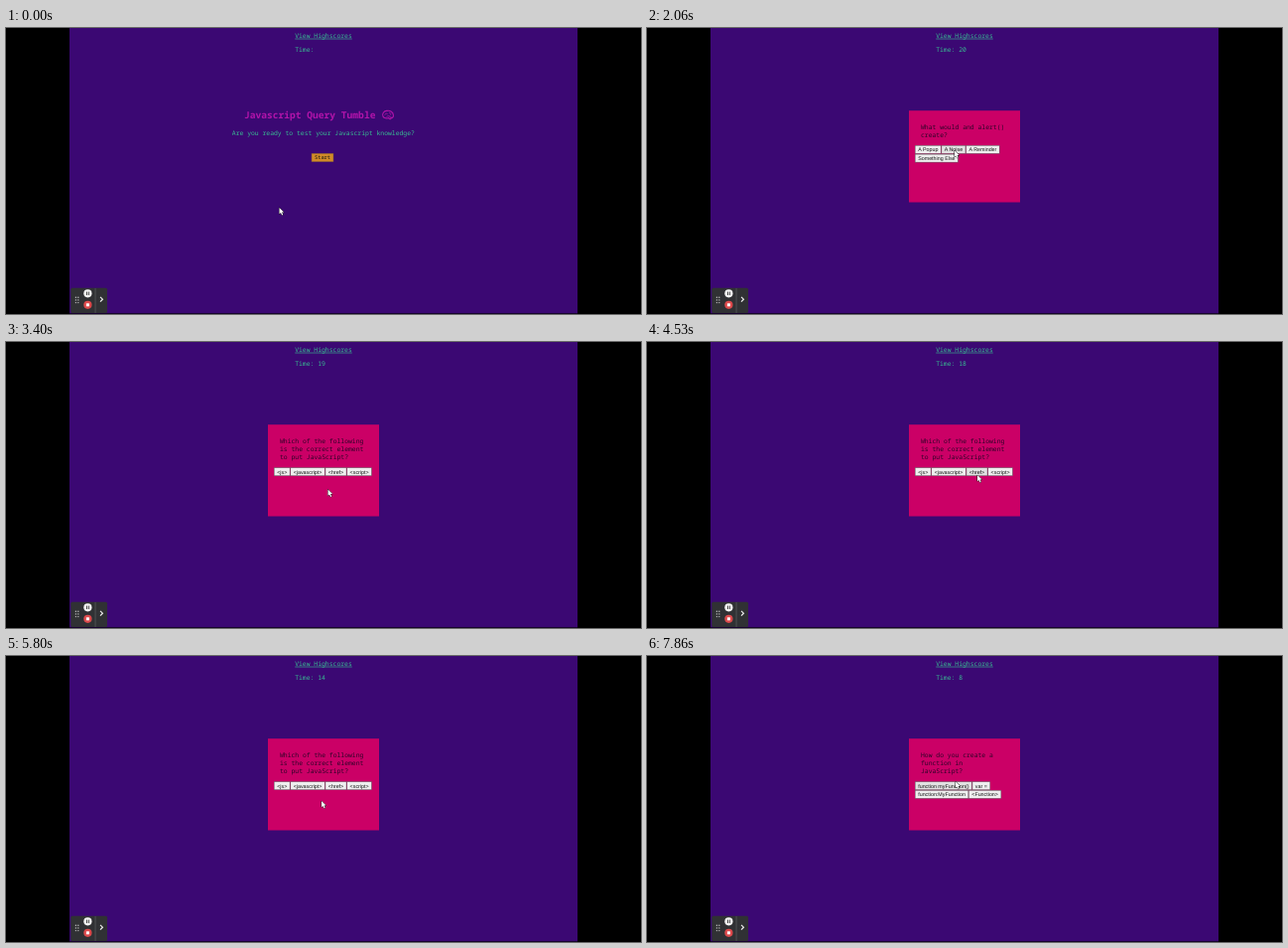
Animation, 640 px wide and 288 px high, one loop 8000 ms. Source, as an HTML page with a canvas:

```html
<!DOCTYPE html>
<html lang="en">
<head>
<meta charset="utf-8">
<title>Quiz</title>
<style>
html, body { margin: 0; height: 100%; overflow: hidden; background: #000; }
canvas { display: block; width: 640px; height: 288px; }
</style>
</head>
<body>
<canvas id="stage" width="640" height="288"></canvas>
<script>
const ctx = document.getElementById('stage').getContext('2d');
const LOOP = 8000;
const MONO = '"Noto Sans Mono", "DejaVu Sans Mono", monospace';
const SANS = '"Liberation Sans", Arial, sans-serif';
const GREEN = '#38bd92', PURPLE = '#3b0873', PINK = '#cb0066', MAGENTA = '#b214aa';

// When each question appears, its text lines and its rows of answers
const questions = [
  { at: 700, lines: ['What would and alert()', 'create?'],
    rows: [['A Popup', 'A Noise', 'A Reminder'], ['Something Else']] },
  { at: 2600, lines: ['Which of the following', 'is the correct element', 'to put JavaScript?'],
    rows: [['<js>', '<javascript>', '<href>', '<script>']] },
  { at: 6660, lines: ['How do you create a', 'function in', 'JavaScript?'],
    rows: [['function myFunction()', 'var ='], ['function:MyFunction', '<Function>']] }
];

// Pointer tip: time, x, y
const path = [
  [0, 275.5, 181], [120, 275.5, 181], [600, 318, 130], [700, 318, 130],
  [860, 322.5, 128.5], [1200, 317, 126], [1400, 317, 126], [2060, 310, 123.5],
  [2450, 288, 123], [2620, 288, 123], [3400, 324.5, 148.5], [3900, 346, 141],
  [4530, 333, 134], [5000, 331, 131], [5120, 331, 131], [5800, 318, 146],
  [6120, 305, 131], [6220, 305, 131], [6580, 353, 131], [6700, 353, 131],
  [6860, 348, 133], [7060, 348, 133], [7300, 338, 131], [7400, 338, 131],
  [7860, 311, 126.5], [8000, 311, 126.5]
];

const wrongClicks = [5100, 6200, 7350];
const FIRST_TICK = 1700;

function pointerAt(t) {
  const i = Math.max(1, path.findIndex(p => p[0] > t));
  const [t0, x0, y0] = path[i - 1], [t1, x1, y1] = path[i];
  const u = (t - t0) / (t1 - t0), k = u * u * (3 - 2 * u);
  return { x: x0 + (x1 - x0) * k, y: y0 + (y1 - y0) * k };
}

function timeLabel(t) {
  if (t < FIRST_TICK) return 'Time:';
  const ticks = Math.floor((t - FIRST_TICK) / 1000);
  const lost = 2 * wrongClicks.filter(c => c <= t).length;
  return 'Time: ' + (20 - ticks - lost);
}

function rect(x, y, w, h, color) {
  ctx.fillStyle = color;
  ctx.fillRect(x, y, w, h);
}

function disc(x, y, r, color) {
  ctx.fillStyle = color;
  ctx.beginPath();
  ctx.arc(x, y, r, 0, 7);
  ctx.fill();
}

function text(str, x, y, size, color, family = MONO, weight = 400) {
  ctx.font = `${weight} ${size}px ${family}`;
  ctx.fillStyle = color;
  ctx.fillText(str, x, y);
}

function button(label, x, y, family, fill, edge, pointer) {
  const size = 16 / 3, h = 8.6;
  ctx.font = `${size}px ${family}`;
  const w = ctx.measureText(label).width + 6.4;
  const over = pointer && pointer.x > x && pointer.x < x + w && pointer.y > y && pointer.y < y + h;
  rect(x, y, w, h, edge);
  rect(x + 0.6, y + 0.6, w - 1.2, h - 1.2, over ? '#e2e2e2' : fill);
  text(label, x + 3.2, y + 6.2, size, '#111', family);
  return w;
}

function brain(x, y) {
  ctx.save();
  ctx.translate(x, y);
  ctx.strokeStyle = MAGENTA;
  ctx.lineWidth = 1.1;
  ctx.stroke(new Path2D('M-5 1.5C-6.5-1-4-4.5-1-4.2C2-5 5.5-2.5 5.4 .3C6 2.3 4 3 3 2.7C3.5 4.5 1.5 4.8 .8 3C-1 3.8-4 3.2-5 1.5Z'));
  ctx.lineWidth = 0.8;
  ctx.stroke(new Path2D('M-3.3 0C-2.5-1.8-.8-1.8-.3-.8M1-2.4C2.7-2.2 3.2-1 2.5 0M-1.5 1.8C0 .5 1.8 .9 3 2.7'));
  ctx.restore();
}

function startPage() {
  text('Javascript Query Tumble', 240, 91, 9.6, MAGENTA, MONO, 700);
  brain(385, 87.6);
  text('Are you ready to test your Javascript knowledge?', 227.8, 108, 6.4, GREEN);
  button('Start', 307.8, 126.2, MONO, '#d18a27', '#8f6135');
}

function card(q, pointer) {
  rect(264, 83.2, 112, 92.3, PINK);
  q.lines.forEach((line, i) => text(line, 276, 101.8 + i * 8.2, 6.4, '#2c0428'));
  const top = 101.8 + q.lines.length * 8.2;
  q.rows.forEach((row, i) => {
    let x = 270;
    for (const label of row) x += button(label, x, top - 0.1 + i * 8.8, SANS, '#efefef', '#75606b', pointer);
  });
}

function recorder() {
  ctx.fillStyle = '#303134';
  ctx.beginPath();
  ctx.roundRect(65.3, 261.8, 36.7, 25.2, 1.5);
  ctx.fill();
  for (let i = 0; i < 6; i++) disc(70.4 + (i % 2) * 2.4, 271.2 + (i >> 1) * 2.7, 0.7, '#c8c8c8');
  disc(82.4, 267.3, 4.1, '#f4f4f4');
  rect(81, 265.6, 0.9, 3.4, '#333');
  rect(82.9, 265.6, 0.9, 3.4, '#333');
  disc(82.4, 278.8, 4.1, '#dc4a4c');
  rect(80.9, 277.3, 3, 3, '#fff');
  rect(89.7, 262, 0.7, 25, '#5b5c5f');
  ctx.strokeStyle = '#f0f0f0';
  ctx.lineWidth = 1.2;
  ctx.stroke(new Path2D('M95 270.8L97.4 273.2L95 275.6'));
}

function arrow({ x, y }) {
  ctx.save();
  ctx.translate(x, y);
  const shape = new Path2D('M0 0V6.2L1.5 4.9L2.6 7.4L3.7 6.9L2.6 4.5H4.6Z');
  ctx.strokeStyle = '#111';
  ctx.lineWidth = 0.9;
  ctx.stroke(shape);
  ctx.fillStyle = '#fff';
  ctx.fill(shape);
  ctx.restore();
}

function draw(t) {
  const pointer = pointerAt(t);
  rect(0, 0, 640, 288, '#000');
  rect(64, 0, 512, 287.4, PURPLE);
  text('View Highscores', 291.2, 9.9, 6.4, GREEN);
  rect(291.2, 10.7, 57.6, 0.6, GREEN);
  text(timeLabel(t), 291.2, 24.2, 6.4, GREEN);
  const q = questions.filter(item => item.at <= t).pop();
  if (q) card(q, pointer); else startPage();
  recorder();
  arrow(pointer);
}

const begin = performance.now();
function frame() {
  draw((performance.now() - begin) % LOOP);
  requestAnimationFrame(frame);
}
ctx.textRendering = 'geometricPrecision';
frame();
</script>
</body>
</html>
```
